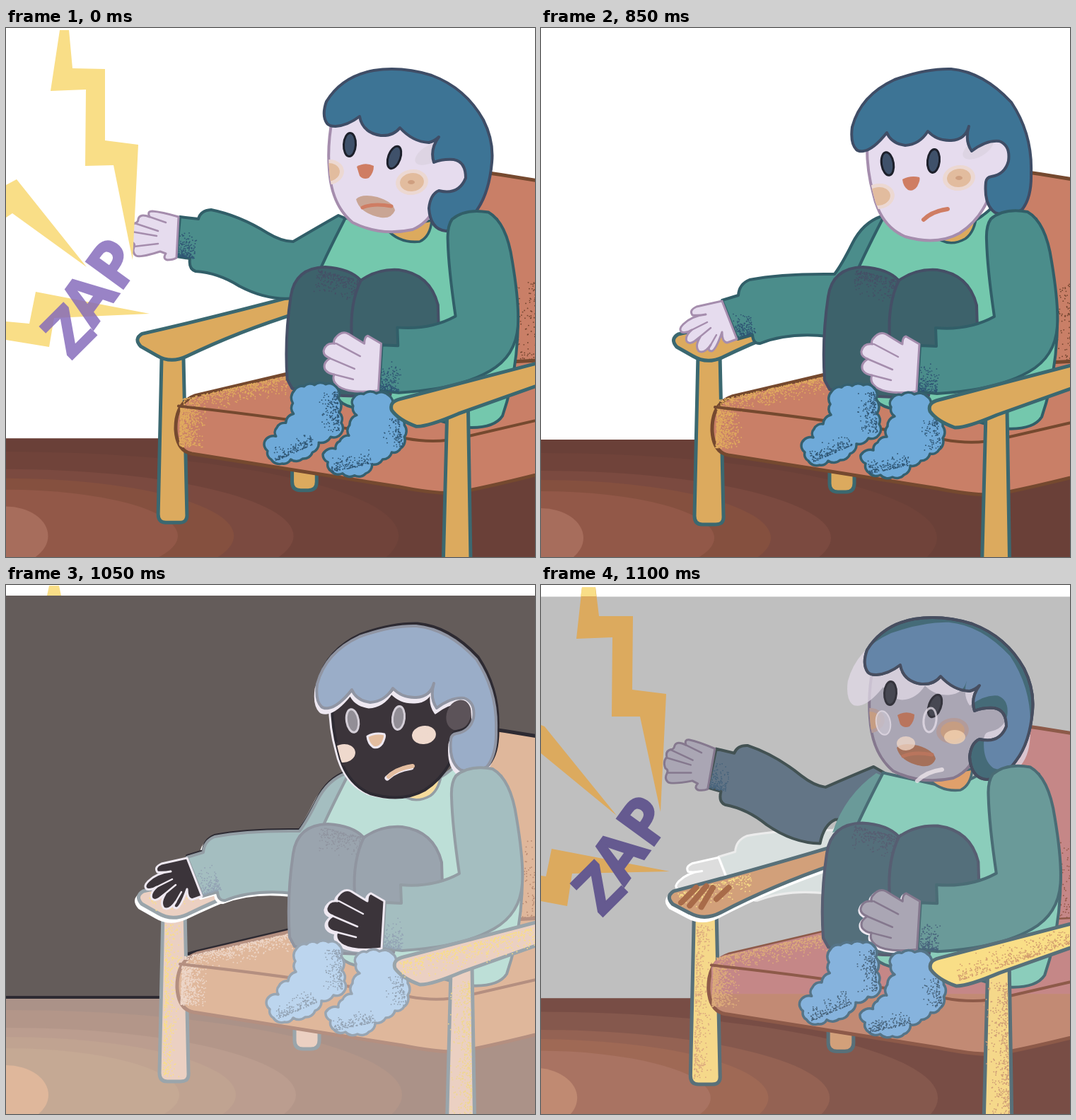
These frames come from a looping animation (748 px wide and 748 px high, 1.15 s). An HTML page:

```html
<!DOCTYPE html>
<html lang="en">
<head>
<meta charset="utf-8">
<title>Static shock</title>
<style>
html, body { margin: 0; width: 100%; height: 100%; overflow: hidden; background: #fff }
svg { display: block; width: 100vw; height: 100vh }
path { stroke-linejoin: round; stroke-linecap: round }
text { font: 700 91px "Open Sans", sans-serif; letter-spacing: 1px; stroke-width: 2.5px }
</style>
</head>
<body>
<svg id="stage" viewBox="0 0 748 748"></svg>
<script>
let seed = 7;
const rand = () => (seed = seed * 16807 % 2147483647) / 2147483647;

const path = (d, fill = 'none', stroke = 'none', width = 4, extra = '') =>
  `<path d="${d}" fill="${fill}" stroke="${stroke}" stroke-width="${width}" ${extra}/>`;
const oval = (x, y, rx, ry, fill, turn = 0, extra = '') =>
  `<ellipse cx="${x}" cy="${y}" rx="${rx}" ry="${ry}" fill="${fill}" transform="rotate(${turn} ${x} ${y})" ${extra}/>`;
const group = (transform, ...parts) => `<g transform="${transform}">${parts.join('')}</g>`;
const clipped = (id, d, content) => `<clipPath id="${id}"><path d="${d}"/></clipPath><g clip-path="url(#${id})">${content}</g>`;
const rim = (d, color, dx, dy, width = 4) => path(d, color, color, width, `transform="translate(${dx} ${dy})"`);

const ink = '#2d2a32', pale = '#eee8f1';

// Grain along a line, thinning out to its right-hand side
function grain(x0, y0, x1, y1, spread, count, color) {
  const dx = x1 - x0, dy = y1 - y0, len = Math.hypot(dx, dy);
  let d = '';
  for (let i = 0; i < count; i++) {
    const k = rand(), off = spread * rand() * rand() / len;
    d += `M${(x0 + dx * k - dy * off).toFixed(1)} ${(y0 + dy * k + dx * off).toFixed(1)}h.2`;
  }
  return path(d, 'none', color, 1.7);
}

// Closed outline of small round bumps through the given points
function fluffy(points, fill, stroke) {
  const p = points.split(' ').map(s => s.split(',').map(Number));
  let [x, y] = p[0], d = `M${x} ${y}`;
  for (const [nx, ny] of [...p.slice(1), p[0]]) {
    const r = Math.hypot(nx - x, ny - y) * .8;
    d += `A${r} ${r} 0 0 1 ${nx} ${ny}`;
    [x, y] = [nx, ny];
  }
  return path(d, fill, stroke, 3.5);
}

const shape = {
  armrest: 'M194 433Q300 409 420 377V402Q330 430 258 465Q235 476 215 464L192 451Q182 440 194 433Z',
  restSleeve: 'M482 266Q455 275 440 305Q425 335 415 348Q340 347 295 356Q280 362 279 378L256 385L278 440L299 434Q300 447 310 446Q350 430 406 436V400Q412 350 455 340Q470 308 497 276Z',
  upperArm: 'M474 266Q430 297 412 350L455 340Q470 308 497 276Z',
  restHand: 'M256 386L220 394Q209 399 214 406Q223 407 233 405Q213 407 201 419Q194 426 199 430Q206 432 213 427Q203 436 206 443Q210 448 217 443L225 437Q217 450 223 457Q231 461 240 448Q234 456 241 457Q247 456 256 430Q256 444 263 445L277 440Z',
  reachSleeve: 'M470 265Q440 282 406 302Q390 302 370 290Q330 265 290 257Q275 258 272 270L246 267L241 323L260 326Q258 341 268 344Q300 346 330 365Q370 386 408 382Q410 355 425 346L450 342Q465 308 499 277Z',
  reachHand: 'M244 267Q220 260 207 259Q199 259 203 267Q189 262 187 270Q187 275 182 276Q175 279 178 287Q173 294 178 303Q183 305 181 310Q178 318 184 322Q190 325 218 316L226 319Q221 326 228 328Q236 328 241 325Z',
  shinHand: 'M535 447L516 436Q511 437 511 447Q499 440 488 433Q478 428 469 440Q466 445 469 447Q456 445 453 457Q452 464 462 468Q451 475 455 484Q459 490 468 491Q464 500 474 508Q490 519 531 514Z',
  seat: 'M242 570Q241 531 270 521L410 488L780 470V628Q690 651 640 660Q610 661 560 651L265 604Q244 600 242 570Z',
  restHair: 'M446 172Q437 163 440 140Q452 95 500 73Q545 57 580 58Q625 62 665 105Q695 150 693 205Q694 240 680 257Q660 268 642 261Q626 250 629 218Q630 211 637 210Q656 207 661 188Q664 166 648 160Q630 158 609 174Q599 160 605 139Q600 158 580 159Q560 160 547 146Q535 165 515 166Q495 163 489 148Q470 172 456 174Q449 175 446 172Z',
  reachHair: 'M454 135Q446 124 453 104Q475 68 520 60Q560 54 602 67Q650 85 675 130Q690 160 687 190Q683 235 664 260Q645 287 622 287Q600 285 598 255Q600 235 612 230Q640 237 650 212Q650 189 633 186Q617 185 605 190Q599 172 612 154Q606 160 598 162Q575 161 557 141Q548 153 530 152Q504 148 500 125Q483 138 466 139Q457 139 454 135Z',
  restFace: 'M461 160Q460 200 470 235Q480 280 515 295Q560 308 592 290Q620 272 633 240L645 214L674 200L670 150L600 120H480Z',
  reachFace: 'M462 125Q454 165 457 200Q460 250 490 275Q530 295 575 285Q605 272 611 236L640 242L664 215V175L600 120H480Z'
};

function rear(c, s) {
  const rings = [[560, 120], [410, 95], [325, 82], [245, 66], [60, 42]];
  return [
    `<rect y="582" width="780" height="190" fill="${c.floor[0]}"/>`,
    clipped('ground' + s, 'M0 582H780V780H0Z', rings.map(([rx, ry], i) => oval(0, 721, rx, ry, c.floor[i + 1])).join('')),
    s == 2 ? path('M0 583H220M256 522L270 518L410 485', 'none', ink) : '',
    path('M660 200Q720 208 780 219V590H640Z', c.back, s == 2 ? ink : c.brown, 5),
    grain(762, 360, 762, 560, 65, 330, c.dark),
    path('M408 625V644Q408 656 420 656H431Q443 656 443 644V625Z', c.wood, c.teal, 5),
    path('M222 462L217 690Q217 702 228 702H247Q259 702 258 690L253 462Z', c.leg, c.teal, 5),
    s > 1 ? grain(226, 480, 222, 695, -25, 400, s == 2 ? '#f9de87' : '#dcaa7e') : '',
    path(shape.seat, c.seat, c.brown, 5),
    s == 3 ? path('M246 540Q250 524 270 521L410 488L780 470V576H246Z', c.back) : '',
    grain(247, 594, 249, 535, 38, 600, c.sand), grain(410, 491, 252, 526, -27, 600, c.sand),
    path('M246 536Q420 555 570 582Q612 590 650 581L780 551', 'none', c.brown, 4),
    s == 3 ? path(shape.restSleeve, '#e5efed', '#fff', 3, 'opacity=".7"') + path(shape.restHand, '#ddd', '#fff', 3) : '',
    group(s == 3 ? 'rotate(-1.8 190 440)' : '',
      s > 1 ? rim(shape.armrest, '#fff', -3, 5, 5) : '',
      path(shape.armrest, c.wood, c.teal, 5),
      s > 1 ? grain(200, 437, 300, 412, 30, 220, '#f9de87') : ''),
    s == 3 ? path('M204 449L225 428M216 453L239 426M232 455L248 428M253 444L270 428', 'none', '#a86b49', 8) : ''
  ].join('');
}

function arm(c, s, reaching) {
  if (!reaching) return [
    s == 2 ? rim(shape.restSleeve, '#fff', -3, 3) + rim(shape.restSleeve, ink, 0, -2) : '',
    path(shape.restSleeve, c.sleeve, c.sleeveLine),
    grain(278, 438, 304, 431, -40, 150, c.dots),
    path(shape.restHand, c.skin, c.skinLine, 3),
    path('M213 427L235 416M217 443L240 424M240 448L248 434', 'none', c.skinLine, 2.5)
  ].join('');
  const [sleeve, line] = s == 3 ? ['#637586', '#435253'] : [c.sleeve, c.sleeveLine];
  return group(s == 3 ? 'rotate(7 470 268) translate(-1 -8)' : '',
    path(shape.reachSleeve, sleeve, line),
    grain(242, 323, 266, 326, -40, 150, c.dots),
    path(shape.reachHand, c.skin, c.skinLine, 3),
    path('M203 267L226 275M182 276L215 287M178 288L213 294M181 309L215 305', 'none', c.skinLine, 2.5))
    + (s == 3 ? path(shape.upperArm, c.sleeve) : '');
}

const torso = (c) => [
  path('M484 268Q452 330 440 360V500L480 532Q500 545 560 540L650 566Q695 570 708 550Q732 480 730 400L700 270L640 252Q600 290 560 285Z', c.shirt, c.sleeveLine),
  path('M401 498Q397 440 406 380Q412 339 455 338Q490 340 506 357Q530 340 560 342Q605 348 616 392L617 425L560 450L548 520Q480 527 408 511Z', c.pants, c.pantsLine),
  path('M506 357Q490 390 493 436', 'none', c.pantsLine),
  grain(445, 342, 505, 357, 35, 220, c.pantsLine)
].join('');

function face(c, s, reaching) {
  const eye = (x, y, turn) => oval(x, y, 8.5, 16.5, c.eye, turn, `stroke="${c.eyeLine}" stroke-width="3"`);
  const cheek = (x, y) => oval(x, y, 23, 18, c.blush, -8) + oval(x, y, 17, 13, c.cheek, -8);
  const bright = s == 2 ? pale : 'none';
  return reaching
    ? clipped('cheek' + s, shape.reachFace, cheek(455, 204)) + cheek(574, 218) + oval(573, 218, 5, 3, c.spot)
      + eye(486, 165, 3) + eye(549, 183, 20)
      + path('M496 196Q508 189 520 195Q520 205 513 212Q505 215 500 209Z', c.nose)
      + path('M495 242Q503 234 525 239Q548 246 550 258Q545 270 530 268Q500 262 495 242Z', c.mouth)
      + path('M504 254Q520 247 545 252', 'none', c.nose, 5)
    : clipped('cheek' + s, shape.restFace, cheek(477, 238)) + cheek(591, 212) + oval(591, 212, 5, 3, c.spot)
      + eye(490, 192, -9) + eye(555, 188, 6)
      + path('M511 214Q522 208 535 211Q537 214 532 224Q526 232 519 229Q512 224 511 214Z', c.nose, bright, 3)
      + path('M539 273Q551 261 573 258', 'none', bright, 7)
      + path('M541 271Q553 259 575 256', 'none', c.nose, 6);
}

function head(c, s, reaching) {
  const hair = reaching ? shape.reachHair : shape.restHair;
  const skull = reaching ? shape.reachFace : shape.restFace;
  const ghost = (fill, extra) => path(shape.restHair, fill, 'none', 0, `transform="matrix(1.02 0 0 1.015 -23 6)" ${extra}`);
  return [
    path(reaching ? 'M538 284Q556 305 585 302Q600 295 602 272Z' : 'M554 292Q575 312 600 298Q614 288 616 262Z', c.collar, c.sleeveLine, 3.5),
    s == 2 ? rim(skull, pale, -3, 0) : '',
    path(skull, c.skin, s == 2 ? ink : c.skinLine),
    s < 2 ? oval(reaching ? 600 : 618, reaching ? 178 : 170, 24, 12, '#d5cdda', -30, 'opacity=".5"') : '',
    s == 2 ? rim(hair, pale, -2, 7, 3) + oval(640, 184, 17, 22, '#5c5359', 20) + path(hair, 'none', ink, 5, 'transform="translate(2 -3)"') : '',
    s == 3 ? ghost('#e2dae7', 'opacity=".75"') : '',
    path(hair, c.hair, c.hairLine),
    s == 3 ? clipped('curls', hair, ghost('#6485a8', '')) + path(hair, 'none', c.hairLine) : '',
    face(c, s, reaching),
    s == 3 ? '<g opacity=".75">' + oval(476, 207, 10, 17, '#c9c4d0', -9, 'stroke="#e8e0eb" stroke-width="2"')
      + oval(542, 203, 9, 17, 'none', 6, 'stroke="#e8e0eb" stroke-width="3"') + oval(508, 236, 13, 10, '#f3d9c8')
      + oval(577, 227, 15, 10, '#f6d6b4') + path('M524 289Q537 276 559 273', 'none', '#f1e8ee', 6) + '</g>' : ''
  ].join('');
}

const front = (c, s) => [
  path('M636 270Q655 254 688 260Q714 275 722 330Q732 390 730 422Q727 465 690 486Q645 512 560 517L532 514L536 449L559 450L558 424Q605 428 641 408Q631 340 630 300Q629 280 636 270Z', c.sleeve, c.sleeveLine),
  grain(533, 513, 560, 516, -45, 150, c.dots),
  s > 1 ? rim(shape.shinHand, pale, -2, 2, 3) : '',
  path(shape.shinHand, c.skin, c.skinLine, 3),
  path('M471 447L505 465M462 468L497 483M468 491L495 498', 'none', c.skinLine, 2.5),
  fluffy('411,514 425,508 440,506 456,505 470,508 474,525 475,545 478,560 478,575 463,580 446,588 437,602 423,611 406,612 394,618 378,612 373,600 369,586 385,579 386,567 399,560 410,547 409,532', c.sock, c.sockLine),
  grain(472, 515, 476, 572, 28, 170, c.dots), grain(440, 590, 385, 614, 22, 150, c.dots),
  fluffy('496,524 510,519 528,518 546,521 551,535 560,550 568,563 568,580 563,596 550,602 537,612 522,619 513,632 497,635 480,632 464,629 459,616 452,604 470,597 476,586 489,578 490,563 500,549 495,536', c.sock, c.sockLine),
  grain(560, 552, 566, 594, 26, 100, c.dots), grain(522, 618, 465, 630, 22, 150, c.dots),
  path('M629 545L623 780H663L659 540Z', c.leg, c.teal, 5),
  s > 1 ? grain(656, 560, 659, 760, 34, 450, s == 2 ? '#f0d78e' : '#cf9d76') : '',
  path('M550 542Q546 530 562 526L780 469V499L645 547Q600 566 585 565Q560 556 550 542Z', c.near, c.teal, 5),
  s == 2 ? grain(556, 534, 748, 484, 32, 500, '#f9de87') : '',
  s == 3 ? grain(748, 505, 590, 558, 30, 400, '#d49f6f') : ''
].join('');

function shock(s) {
  const bolts = s
    ? ['58,3 77,3 82,44 130,44 129,148 177,154 169,321 140,186 100,186 101,74 50,76', '0,198 5,200 107,326 0,238', '0,411 7,412 15,373 182,405 44,408 37,454 0,447']
    : ['76,3 89,3 94,57 140,58 140,159 187,165 179,328 152,194 112,195 113,87 63,89', '0,222 15,214 114,338 9,262 0,268', '0,415 33,418 42,373 203,404 68,410 61,451 0,441'];
  const color = s ? '#655a90' : '#8368ba';
  return bolts.map(p => `<polygon points="${p}" fill="${s ? '#dcaa5e' : '#f9de87'}"/>`).join('')
    + (s ? '<path d="M58 3H77L78 16H56Z" fill="#f9de87"/>' : '')
    + `<text transform="translate(${s ? 86 : 92} 470) rotate(-54)" rotate="9 0 0" fill="${color}" stroke="${color}" opacity="${s ? 1 : .82}">ZAP</text>`;
}

const day = {
  floor: ['#6a4038', '#70433a', '#7b4a40', '#85503f', '#925848', '#a76d5c'],
  back: '#c97f67', seat: '#c97f67', brown: '#75492f', dark: '#74452f', sand: '#e0aa5e',
  wood: '#dcaa5e', leg: '#dcaa5e', near: '#dcaa5e', teal: '#3b6870', sleeve: '#4b8d8b', sleeveLine: '#315e68',
  shirt: '#74c8ad', pants: '#3d626b', pantsLine: '#454f66', sock: '#6faad9', sockLine: '#35606f', dots: '#2f5674',
  skin: '#e6dcee', skinLine: '#a58dad', hair: '#3d7495', hairLine: '#3f4d66', eye: '#3f516a', eyeLine: '#1d202b',
  nose: '#cf7d63', blush: '#ecd8d2', cheek: '#e2bc9e', spot: '#cf9f80', mouth: '#c9a594', collar: '#dcaa5e'
};
const flash = {
  ...day, floor: ['#ab9288', '#b39689', '#bb9d8f', '#c0a391', '#c5a994', '#dfb79b'],
  back: '#dfb79b', seat: '#dfb79b', brown: '#b48f80', dark: '#b88a72', sand: '#edd6c8',
  wood: '#ebd0c2', leg: '#ebd0c2', near: '#ebd0c2', teal: '#9aa5ab', sleeve: '#a4bec0', sleeveLine: '#939da4',
  shirt: '#bddfd7', pants: '#9aa4ae', pantsLine: '#9095a0', sock: '#bcd5ee', sockLine: '#98a5b2', dots: '#93a3b4',
  skin: '#3b343a', skinLine: pale, hair: '#9aadc8', hairLine: '#9095a3', eye: '#928e96', eyeLine: '#d5cfd8',
  nose: '#e3bd9f', blush: '#3b343a', cheek: '#efd9cd', spot: '#efd9cd', collar: '#f6dc9c'
};
const fade = {
  ...day, floor: ['#784d45', '#85584d', '#946253', '#9f6955', '#a97362', '#c08a72'],
  back: '#c58787', seat: '#c28a74', brown: '#8d5a49', dark: '#94584a', sand: '#dcab7a',
  wood: '#d2a07a', leg: '#f5d88a', near: '#f9de87', teal: '#587079', sleeve: '#6a9a99', sleeveLine: '#4a6c75',
  shirt: '#8bcdbb', pants: '#546f7b', pantsLine: '#575e72', sock: '#86b3dd', sockLine: '#557487', dots: '#48647c',
  skin: '#aaa6b4', skinLine: '#85788e', hair: '#456b78', hairLine: '#474e60', eye: '#474852', eyeLine: '#35343d',
  nose: '#b9755d', blush: '#b39b9a', cheek: '#c69d82', spot: '#c69d82', mouth: '#a5705a', collar: '#e0a06b'
};

const scenes = [
  { c: day, wall: '#fff', top: 0, base: 'matrix(.9916 0 0 .9926 0 2.5)', pose: '', reaching: true },
  { c: day, wall: '#fff', top: 0, base: '', pose: '' },
  { c: flash, wall: '#645c5a', top: 15, base: '', pose: '' },
  { c: fade, wall: '#bfbfbf', top: 16.5, base: 'matrix(1.02 0 0 1.015 -10 -6.5)', pose: 'translate(8 -12)', reaching: true }
];

stage.innerHTML = scenes.map(({ c, wall, top, base, pose, reaching }, s) => '<g>'
  + `<rect width="748" height="748" fill="#fff"/><rect y="${top}" width="748" height="740" fill="${wall}"/>`
  + (s == 2 ? '<path d="M61 1H75L78 15H58Z" fill="#f9de87"/>' : '')
  + group(base, rear(c, s)) + arm(c, s, reaching) + group(base, torso(c))
  + group(pose, head(c, s, reaching)) + group(base, front(c, s))
  + (reaching ? shock(s) : '') + '</g>').join('');

const layers = [...stage.children], ends = [850, 1050, 1100, 1150];
function tick() {
  const t = performance.now() % 1150, current = ends.findIndex(end => t < end);
  layers.forEach((layer, i) => layer.style.display = i == current ? '' : 'none');
  requestAnimationFrame(tick);
}
tick();
</script>
</body>
</html>
```
